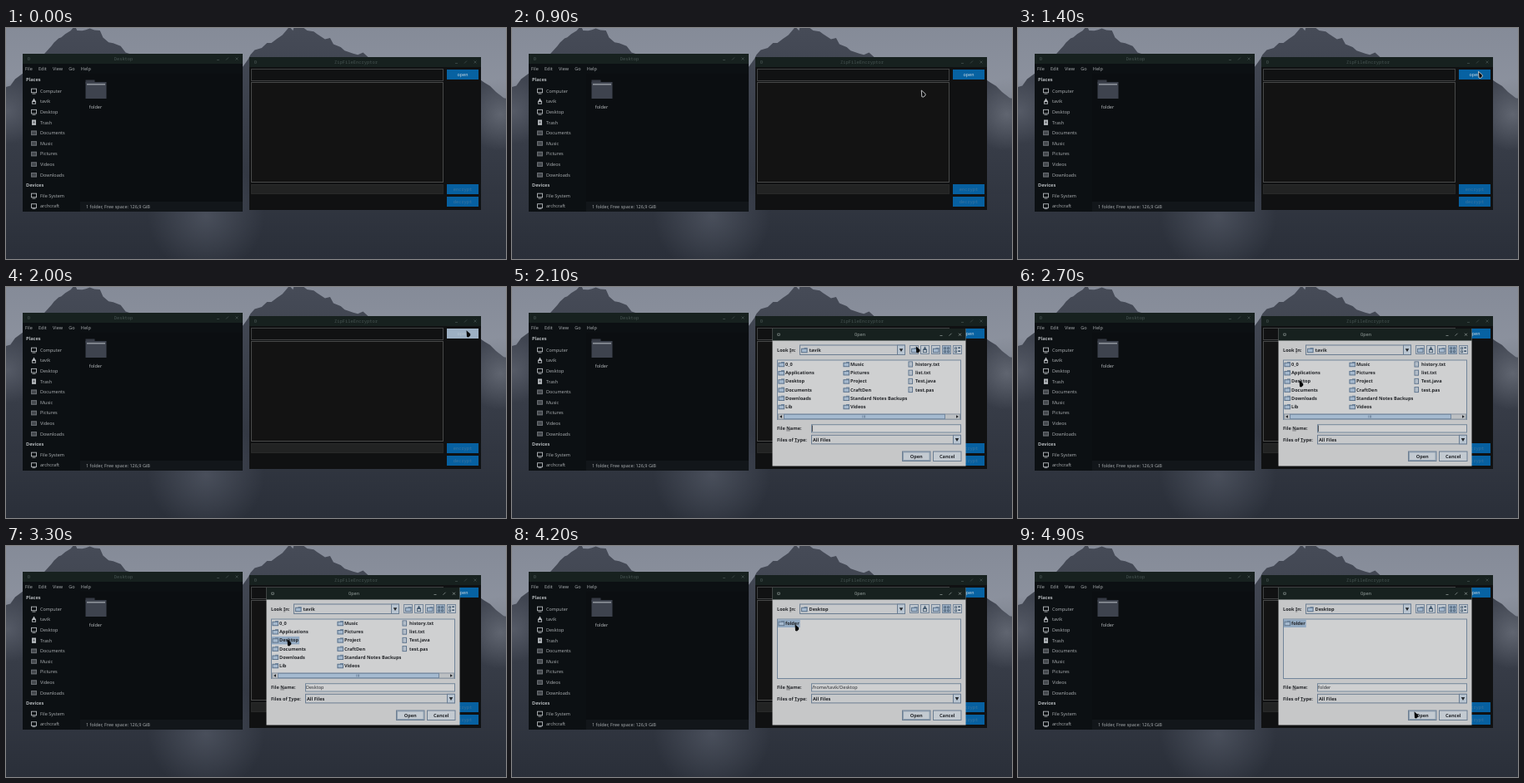
An HTML page with a canvas that plays this animation: 600x278 px, repeating every 5 s.

```html
<!DOCTYPE html>
<html lang="en">
<head>
<meta charset="utf-8">
<style>
html, body { margin: 0; width: 100%; height: 100%; overflow: hidden; background: #2b303a; }
canvas { display: block; width: 600px; height: 278px; }
</style>
</head>
<body>
<canvas id="stage" width="600" height="278"></canvas>
<script>
const ctx = document.getElementById('stage').getContext('2d');
const LOOP = 5000, STEP = 100;
const SANS = '5.5px "Noto Sans", sans-serif';
const BOLD = 'bold 5.6px "Noto Sans", sans-serif';
const MONO = '5.4px "Noto Sans Mono", monospace';
const INK = '#25272b', PALE = '#a4a8ab', TITLE = '#475452', EDGE = '#6b7d91';
const USER = 'tavik';

// Moments at which the interface changes
const SHOW = 400, PRESS = 2000, DIALOG = 2100, PICK = 3200, ENTER = 3500, MARK = 4200, NAMED = 4300;

// Pointer: where it comes in, then eased moves to a goal
const ENTRY = { x: 372, y: 18 };
const MOVES = [
  { from: SHOW, to: 500, x: 382, y: 115 },
  { from: 700, to: 1200, x: 552, y: 52 },
  { from: PRESS, to: 2580, x: 337, y: 112 },
  { from: ENTER, to: 4000, x: 339, y: 94 },
  { from: MARK, to: 4600, x: 421, y: 165 },
  { from: 4700, to: 4900, x: 475, y: 199 }
];

function rect(x, y, w, h, color) {
  ctx.fillStyle = color;
  ctx.fillRect(x, y, w, h);
}

function frame(x, y, w, h, color, width = 1) {
  ctx.strokeStyle = color;
  ctx.lineWidth = width;
  ctx.strokeRect(x + width / 2, y + width / 2, w - width, h - width);
}

function box(x, y, w, h, fill, border) {
  rect(x, y, w, h, fill);
  frame(x, y, w, h, border);
}

function poly(points, color) {
  ctx.beginPath();
  points.forEach(([x, y]) => ctx.lineTo(x, y));
  ctx.closePath();
  ctx.fillStyle = color;
  ctx.fill();
}

function triangle(x, y, r, angle, color) {
  poly([0, 1, 2].map(i => {
    const a = angle + i * Math.PI * 2 / 3;
    return [x + r * Math.cos(a), y + r * Math.sin(a)];
  }), color);
}

function line(x1, y1, x2, y2, color, width = 0.7) {
  ctx.beginPath();
  ctx.moveTo(x1, y1);
  ctx.lineTo(x2, y2);
  ctx.strokeStyle = color;
  ctx.lineWidth = width;
  ctx.stroke();
}

// y is the vertical middle of the lowercase letters
function text(str, x, y, color, font = SANS, align = 'left') {
  ctx.font = font;
  ctx.textAlign = align;
  ctx.fillStyle = color;
  ctx.fillText(str, x, y + 2);
}

function label(str, key, x, y) {
  text(str, x, y, INK, BOLD);
  const left = x + ctx.measureText(str.slice(0, str.indexOf(key))).width;
  rect(left, y + 2.7, ctx.measureText(key).width, 0.5, INK);
}

function fade(top, bottom) {
  const g = ctx.createLinearGradient(0, 0, 0, 278);
  g.addColorStop(0, top);
  g.addColorStop(1, bottom);
  return g;
}

function glow(x, y, r, rgb) {
  const g = ctx.createRadialGradient(x, y, 0, x, y, r);
  g.addColorStop(0, `rgba(${rgb},.7)`);
  g.addColorStop(1, `rgba(${rgb},0)`);
  rect(x - r, y - r, 2 * r, 2 * r, g);
}

// A jagged skyline through a few key points
function ridge(points, seed) {
  const random = () => (seed = seed * 16807 % 2147483647) / 2147483647 - 0.5;
  const edge = points.slice(1).flatMap(([x, y], i) => {
    const [px, py] = points[i];
    return Array.from({ length: 6 }, (_, k) =>
      [px + (x - px) * k / 6 + random() * 4, py + (y - py) * k / 6 + random() * 7]);
  });
  const right = points[points.length - 1];
  poly([...edge, right, [right[0], 278], [points[0][0], 278]], fade('#464b57', '#292e38'));
}

function mountains() {
  rect(0, 0, 600, 278, fade('#858b98', '#a0a5b0'));
  ridge([[-5, 75], [48, 30], [78, 0], [105, 0], [143, 30], [300, 90]], 17);
  ridge([[270, 60], [300, 30], [340, 0], [362, 0], [400, 22], [445, 38], [560, 56], [605, 86]], 29);
  rect(0, 200, 600, 78, fade('#454a56', '#2a2f39'));
  glow(2, 100, 40, '96,101,113');
  glow(594, 104, 44, '112,117,128');
  glow(240, 226, 70, '84,90,103');
}

function titleBar(x, y, w, h, title, color) {
  rect(x, y, w, h, '#17211f');
  const mid = y + h / 2, r = x + w - 7;
  text(title, x + w / 2 - 11, mid, color, MONO, 'center');
  frame(x + 6, mid - 1.5, 3, 3, color, 0.6);
  rect(r - 24, mid + 1, 3, 0.7, color);
  line(r - 13, mid + 1.5, r - 10, mid - 1.5, color);
  for (const s of [-1.5, 1.5]) line(r - 1.5, mid - s, r + 1.5, mid + s, color);
}

function sideIcon(kind, y) {
  const color = '#b3b7bb';
  if (kind === 'screen') {
    frame(30, y - 3, 7, 5.5, color, 0.9);
    rect(31.5, y + 3, 4, 0.8, color);
  } else if (kind === 'home') {
    triangle(33.5, y - 0.8, 3, -Math.PI / 2, color);
    frame(31, y - 0.5, 5, 3.8, color, 0.9);
  } else if (kind === 'bin') {
    rect(31, y - 3, 5, 6.4, color);
    rect(32.5, y - 1, 2, 2, '#55595d');
  } else {
    box(30, y - 2.5, 7, 5.5, '#43474c', '#6a6e73');
  }
}

function fileManager() {
  rect(20, 31, 264, 190, '#0c1013');
  rect(89, 55, 195, 154, '#0b0e11');
  rect(89, 209, 195, 12, '#12161a');
  titleBar(20, 31, 264, 12, 'Desktop', TITLE);

  let x = 23;
  for (const item of ['File', 'Edit', 'View', 'Go', 'Help']) {
    text(item, x, 49, PALE);
    x += ctx.measureText(item).width + 7.2;
  }

  text('Places', 24, 62, '#b2b6b9', BOLD);
  text('Devices', 24, 189, '#b2b6b9', BOLD);
  const icons = ['screen', 'home', 'screen', 'bin'];
  ['Computer', USER, 'Desktop', 'Trash', 'Documents', 'Music', 'Pictures', 'Videos', 'Downloads',
   '', 'File System', 'archcraft'].forEach((name, i) => {
    if (!name) return;
    const y = 75.7 + i * 12.6;
    sideIcon(i > 9 ? 'screen' : icons[i], y);
    text(name, 41, y, PALE);
  });

  rect(95.5, 62.5, 11, 5, '#363a44');
  rect(95.5, 65, 25, 20, '#3e434e');
  rect(97, 67, 22, 1.6, '#8d9299');
  text('folder', 107.5, 94.5, '#b2b6b9', SANS, 'center');
  text('1 folder, Free space: 126,9 GiB', 96, 215, PALE);
}

function blueButton(str, y, fill, color) {
  rect(529, y, 38, 12, fill);
  text(str, 548, y + 6, color, MONO, 'center');
}

function encryptor(t) {
  rect(292, 35, 278, 184, '#101112');
  titleBar(292, 35, 278, 12, 'ZipFileEncryptor', TITLE);
  box(294, 49, 231, 15, '#111213', '#404142');
  box(294, 65, 231, 121, '#131313', '#484949');
  box(294, 188, 231, 12, '#222323', '#282929');
  const pressed = t >= PRESS && t < DIALOG;
  blueButton('open', 50, pressed ? '#9db0c3' : '#0762a2', pressed ? '#b7c4d0' : '#cfdae2');
  blueButton('encrypt', 188, '#0760a0', '#3d759f');
  blueButton('decrypt', 203, '#0760a0', '#3d759f');
}

function folderIcon(x, y) {
  rect(x + 3.5, y - 3, 4, 2, '#647b94');
  box(x, y - 2.2, 7.5, 5.4, '#a5b9ce', '#5f748b');
}

function fileIcon(x, y) {
  box(x, y - 3.5, 5.5, 7, '#c3cad2', '#61768e');
  for (const dy of [-1, 1]) rect(x + 1.3, y + dy, 2.7, 0.5, '#7e92a8');
}

function entry(str, col, row, selected) {
  const x = 319 + col * 78, y = 93 + row * 10.2;
  ctx.font = BOLD;
  if (selected) rect(x, y - 4.5, ctx.measureText(str).width + 10, 9.5, '#93aac2');
  (str.includes('.') ? fileIcon : folderIcon)(x + 0.5, y);
  text(str, x + 9, y, INK, BOLD);
}

function combo(x, y, w, h) {
  box(x, y, w, h, '#c7c9cb', EDGE);
  box(x + w - 10, y, 10, h, '#b9c5d1', EDGE);
  triangle(x + w - 5, y + h / 2 - 0.3, 2.6, Math.PI / 2, INK);
}

function toolButtons() {
  const mark = '#43596f';
  for (let i = 0; i < 5; i++) {
    const x = 477 + i * 13;
    box(x, 70, 11, 11, i === 3 ? '#9bafc4' : '#c2c9d0', '#75869a');
    if (i === 1) {
      triangle(x + 5.5, 74.5, 3, -Math.PI / 2, mark);
      frame(x + 3, 75, 5, 4, mark, 0.8);
    } else if (i < 3) {
      folderIcon(x + 2, 76);
    } else {
      for (const dy of [0, 4]) {
        frame(x + 2.2, 72.4 + dy, 2.8, 2.8, mark, 0.8);
        frame(x + 6.2, 72.4 + dy, 2.8, i === 3 ? 2.8 : 1.6, mark, 0.8);
      }
    }
  }
}

function scrollBar() {
  box(319, 152.5, 219, 7, '#bdc0c3', '#8c96a1');
  box(326, 152.8, 194, 6.4, '#a5bad0', '#71869d');
  triangle(323, 156, 2, Math.PI, INK);
  triangle(534, 156, 2, 0, INK);
  for (let i = 0; i < 3; i++) rect(420.5 + i * 1.5, 154.5, 0.6, 3, '#5b7189');
}

function fileList(t) {
  box(318, 87.5, 221, 72.5, '#cfd0d1', '#72859a');
  if (t >= ENTER) return entry('folder', 0, 0, t >= MARK);
  [['0_0', 'Applications', 'Desktop', 'Documents', 'Downloads', 'Lib'],
   ['Music', 'Pictures', 'Project', 'CraftDen', 'Standard Notes Backups', 'Videos'],
   ['history.txt', 'list.txt', 'Test.java', 'test.pas']]
    .forEach((names, col) => names.forEach((name, row) =>
      entry(name, col, row, t >= PICK && name === 'Desktop')));
  scrollBar();
}

function fileName(t) {
  if (t >= NAMED) return 'folder';
  if (t >= ENTER) return `/home/${USER}/Desktop`;
  return t >= PICK ? 'Desktop' : '';
}

function dialog(t) {
  rect(312.5, 50, 232, 165.5, '#c6c7c8');
  titleBar(312.5, 50, 232, 14.5, 'Open', '#9ba5a2');

  label('Look In:', 'I', 318, 76);
  combo(345, 69.5, 127, 12.5);
  folderIcon(347, 76);
  text(t >= ENTER ? 'Desktop' : USER, 356.5, 76, INK, BOLD);
  toolButtons();
  fileList(t);

  label('File Name:', 'N', 318, 170);
  box(359, 165.2, 180, 10.3, '#cfd0d1', '#72859a');
  if (fileName(t)) text(fileName(t), 360, 170.2, '#303338');
  else rect(360.3, 166.5, 0.7, 7.5, INK);

  label('Files of Type:', 'T', 318, 183.5);
  combo(359, 177.8, 180, 11.6);
  text('All Files', 361, 183.5, INK, BOLD);

  ['Open', 'Cancel'].forEach((name, i) => {
    const x = 468 + i * 37;
    box(x, 197.5, 34.5, 12.5, '#c3cad1', EDGE);
    if (!i) frame(x + 1, 198.5, 32.5, 10.5, '#7e91a5', 0.8);
    text(name, x + 17.2, 203.7, INK, BOLD, 'center');
  });
}

function pointerAt(t) {
  let { x, y } = ENTRY;
  for (const move of MOVES) {
    const u = Math.min(1, Math.max(0, (t - move.from) / (move.to - move.from)));
    const k = 1 - (1 - u) ** 2;
    x += (move.x - x) * k;
    y += (move.y - y) * k;
  }
  return [x, y];
}

function pointer(t) {
  if (t < SHOW) return;
  ctx.save();
  ctx.translate(...pointerAt(t));
  poly([[0.5, 0.3], [5.3, 4.6], [5.2, 6.5], [3, 8.4], [1, 8]], '#08090a');
  if (t < PRESS) {
    ctx.lineJoin = 'round';
    ctx.strokeStyle = '#d4d6d8';
    ctx.lineWidth = 0.9;
    ctx.stroke();
  }
  ctx.restore();
}

function draw(now) {
  const t = Math.floor(now % LOOP / STEP) * STEP;
  mountains();
  fileManager();
  encryptor(t);
  if (t >= DIALOG) dialog(t);
  pointer(t);
}

ctx.textRendering = 'geometricPrecision';
const start = performance.now();
function tick() {
  draw(performance.now() - start);
  requestAnimationFrame(tick);
}
tick();
</script>
</body>
</html>
```
